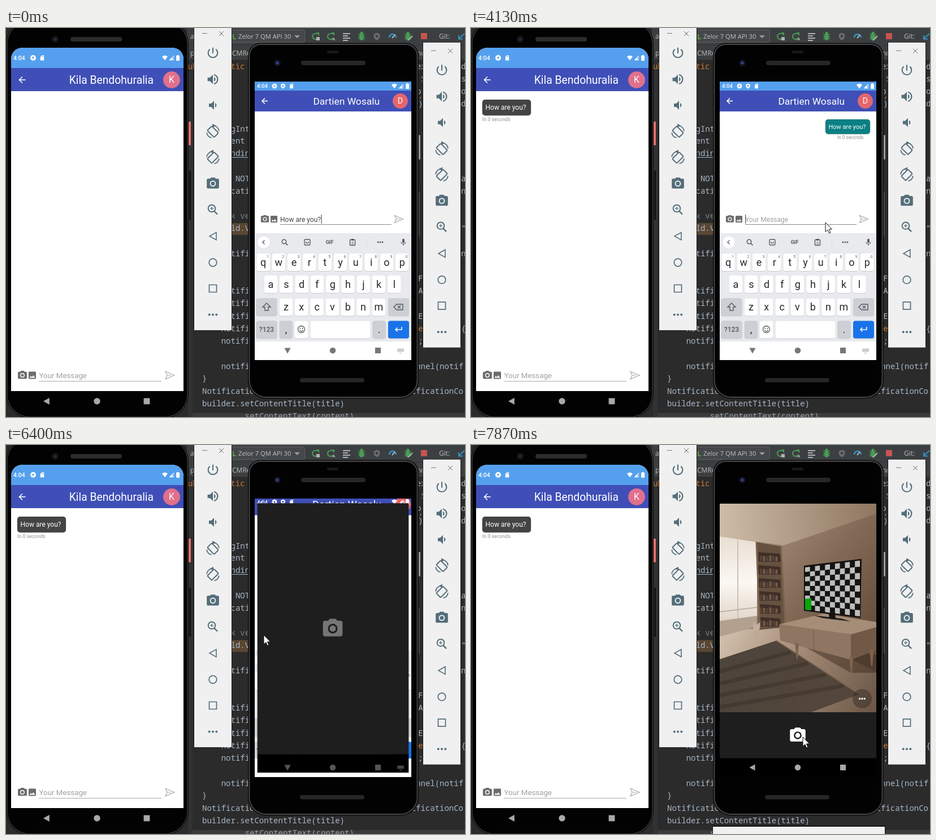
Animation, 812 px wide and 690 px high, one loop 8 s. Source, as an HTML page with a canvas:

```html
<!DOCTYPE html>
<html lang="en">
<head>
<meta charset="utf-8">
<title>Chat on two devices</title>
<style>
html, body { margin: 0; width: 100%; height: 100%; overflow: hidden; background: #2b2b2b; }
canvas { display: block; }
</style>
</head>
<body>
<canvas id="stage" width="812" height="690"></canvas>
<script>
const c = document.getElementById('stage').getContext('2d');
const LOOP = 8000, STEP = 200 / 3;
const LAUNCH = 6293, CLEAR = 2460, PREVIEW = 7480;
const SANS = 'Roboto, sans-serif', MONO = '"Noto Sans Mono", "DejaVu Sans Mono", monospace';
const clamp = v => Math.max(0, Math.min(1, v));
const ramp = (t, a, b) => clamp((t - a) / (b - a));

// Two-part curve: short fast start, long slow finish.
const cubic = (a, b, d, e, s) => a * (1 - s) ** 3 + 3 * b * (1 - s) ** 2 * s + 3 * d * (1 - s) * s * s + e * s ** 3;
function settle(x) {
  const early = x < 1 / 6;
  const xs = early ? [0, .05, .1333, 1 / 6] : [1 / 6, .2083, .25, 1];
  const ys = early ? [0, 0, .06, .4] : [.4, .82, 1, 1];
  let lo = 0, hi = 1;
  for (let i = 0; i < 20; i++) {
    const mid = (lo + hi) / 2;
    if (cubic(...xs, mid) < x) lo = mid; else hi = mid;
  }
  return cubic(...ys, hi);
}

// ---- drawing helpers ----
function rect(x, y, w, h, fill) { c.fillStyle = fill; c.fillRect(x, y, w, h); }
function round(x, y, w, h, r, fill, line, lw = 1) {
  c.beginPath(); c.roundRect(x, y, w, h, r);
  if (fill) { c.fillStyle = fill; c.fill(); }
  if (line) { c.strokeStyle = line; c.lineWidth = lw; c.stroke(); }
}
function disc(x, y, r, fill, line, lw = 1) {
  c.beginPath(); c.arc(x, y, r, 0, 7);
  if (fill) { c.fillStyle = fill; c.fill(); }
  if (line) { c.strokeStyle = line; c.lineWidth = lw; c.stroke(); }
}
function trace(p) { c.beginPath(); for (let i = 0; i < p.length; i += 2) c.lineTo(p[i], p[i + 1]); }
function poly(p, fill) { trace(p); c.closePath(); c.fillStyle = fill; c.fill(); }
function line(p, color, lw = 1, close) {
  trace(p); if (close) c.closePath();
  c.strokeStyle = color; c.lineWidth = lw; c.stroke();
}
function text(s, x, y, size, color, align = 'left', font = SANS) {
  c.font = (typeof size === 'number' ? size + 'px ' : size + ' ') + font;
  c.fillStyle = color; c.textAlign = align; c.fillText(s, x, y);
}
function grad(x0, y0, x1, y1, ...stops) {
  const g = c.createLinearGradient(x0, y0, x1, y1);
  stops.forEach((s, i) => g.addColorStop(i / (stops.length - 1), s));
  return g;
}
function group(fn, alpha = 1) { c.save(); c.globalAlpha *= alpha; fn(); c.restore(); }
function zoom(s, x, y) { c.translate(x, y); c.scale(s, s); c.translate(-x, -y); }

const icons = {
  camera: 'M9 2L7.2 4H4c-1.1 0-2 .9-2 2v12c0 1.1.9 2 2 2h16c1.1 0 2-.9 2-2V6c0-1.1-.9-2-2-2h-3.2L15 2zM12 7a5 5 0 1 0 0 10a5 5 0 1 0 0-10zM12 8.8a3.2 3.2 0 1 0 0 6.4a3.2 3.2 0 1 0 0-6.4z',
  image: 'M21 19V5c0-1.1-.9-2-2-2H5c-1.1 0-2 .9-2 2v14c0 1.1.9 2 2 2h14c1.1 0 2-.9 2-2zM8.5 13.5l2.5 3L14.5 12l4.5 6H5z',
  power: 'M13 3h-2v10h2zM17.8 5.2l-1.4 1.4A6.9 6.9 0 0 1 19 12a7 7 0 1 1-11.4-5.4L6.2 5.2A8.9 8.9 0 0 0 3 12a9 9 0 0 0 18 0c0-2.7-1.2-5.2-3.2-6.8z',
  louder: 'M3 9v6h4l5 5V4L7 9zM16.5 12A4.5 4.5 0 0 0 14 8v8a4.5 4.5 0 0 0 2.5-4zM14 3.2v2.1a7 7 0 0 1 0 13.4v2.1a9 9 0 0 0 0-17.6z',
  softer: 'M18.5 12A4.5 4.5 0 0 0 16 8v8a4.5 4.5 0 0 0 2.5-4zM5 9v6h4l5 5V4L9 9z',
  mic: 'M12 14a3 3 0 0 0 3-3V5a3 3 0 0 0-6 0v6a3 3 0 0 0 3 3zM17.3 11a5.3 5.3 0 0 1-10.6 0H5a7 7 0 0 0 6 6.7V21h2v-3.3a7 7 0 0 0 6-6.7z',
  wifi: 'M12 21L23 7A18 18 0 0 0 1 7z',
  signal: 'M2 22h20V2zM17 20V9L20 6v14z',
  battery: 'M9 2h6v2h3v18H6V4h3z',
  card: 'M10 2h9v20H5V8zM10 5v4h2V5zM14 5v4h2V5z',
  shield: 'M12 1L3 5v6c0 6 4 10 9 12c5-2 9-6 9-12V5zM12 7a4 4 0 1 0 0 8a4 4 0 1 0 0-8z'
};
for (const k in icons) icons[k] = new Path2D(icons[k]);
function icon(name, x, y, size, color) {
  group(() => {
    c.translate(x - size / 2, y - size / 2); c.scale(size / 24, size / 24);
    c.fillStyle = color; c.fill(icons[name], 'evenodd');
  });
}
function dots(x, y, gap, r, color) { for (let i = -1; i < 2; i++) disc(x + i * gap, y, r, color); }
function gear(x, y, r, color) {
  disc(x, y, r * .6, null, color, r * .5);
  for (let i = 0; i < 8; i++) {
    const a = i * Math.PI / 4;
    disc(x + Math.cos(a) * r * .85, y + Math.sin(a) * r * .85, r * .22, color);
  }
}
function back(x, y, s) {
  line([x + s, y, x - s, y], '#fff', 1.6);
  line([x, y - s, x - s, y, x, y + s], '#fff', 1.6);
}
function send(x, y, s) {
  line([x - s, y - s * .85, x + s, y, x - s, y + s * .85, x - s * .6, y], '#aaa', 1.2, true);
  line([x - s * .6, y, x + s * .3, y], '#aaa', 1);
}

// ---- editor behind the devices ----
function code(s, col, y, color = '#a9b7c6') { text(s, 347 + col * 8.42, y + 5, 14, color, 'left', MONO); }

function editor() {
  rect(0, 0, 812, 690, '#2b2b2b');
  rect(320, 0, 492, 57, '#3c3f41');
  rect(320, 30, 492, 1, '#323232');
  rect(320, 56, 492, 1, '#323232');
  rect(322, 57, 8, 633, '#303234');
  rect(400, 346, 30, 21, '#5a4632');
  const orange = '#cc7832', ui = '"Open Sans", sans-serif';
  text('a', 326, 19, 12, '#bbb', 'left', ui);
  text('p', 326, 49, 12, '#bbb', 'left', ui);
  text('CMReceiver', 400, 49, 12, '#bbb', 'left', ui);
  text('nd', 727, 49, 12, '#bbb', 'left', ui);
  round(396.5, 3.5, 132, 22, 3, '#45484a', '#5e6060');
  line([402, 11, 402, 19, 407, 19], '#62b543', 1.5);
  text('Zelor 7 QM API 30', 411, 19, 11.2, '#c0c0c0', 'left', ui);
  poly([510, 13, 520, 13, 515, 18], '#9a9da0');
  toolbar();

  code('public static', -4, 68, orange);
  const rows = [[179, 'gInt'], [200, 'ent'], [222, 'ndin'], [267, ' NOT'], [289, 'cati'],
    [333, 'k ve', '#808080'], [355, 'ld.V'], [400, 'tifi'], [466, 'tifi'], [488, 'tifi'], [511, 'tifi'],
    [533, 'tifi'], [555, 'tifi']];
  rows.forEach(([y, s, col]) => code(s, 6, y, col));
  line([400, 229.5, 428, 229.5], '#a9b7c6');
  code('no', 4, 533);
  code('no', 4, 555);
  code('notificationManager.createNotificationChannel(notif', 4, 600);
  code('}', 0, 621);
  code('NotificationCompat.Builder builder = new NotificationCo', 0, 644);
  code('builder.setContentTitle(title)', 0, 666);
  code('.setContentText(content)', 8, 688);
  rect(330, 683, 482, 7, 'rgba(100,100,100,.28)');

  [[68, 'ext'], [90, ' S'], [112, 'p']].forEach(([y, s]) => code(s, 45, y));
  [[119, ',', orange], [134, ')'], [444, 'FA'], [466, 'Ap'], [511, 'EA'], [533, 'ew', orange], [555, ';']]
    .forEach(([y, s, col]) => code(s, 45.4, y, col));
  [[68, 'd'], [90, 's'], [112, 'o'], [134, 'd'], [267, 'a'], [289, 'n'], [355, '"'], [400, 'n'], [533, '{']]
    .forEach(([y, s, col]) => code(s, 54.4, y, col));
}

function toolbar() {
  const green = '#499c54', grey = '#afb1b3', y = 15;
  [547, 574].forEach((x, i) => {
    c.beginPath(); c.arc(x, y, 5, .6, 5.2); c.strokeStyle = green; c.lineWidth = 2; c.stroke();
    poly([x + 1, 8, x + 7, 8, x + 7, 14], green);
    if (i) text('A', x + 3, 22, 'bold 8px', grey); else rect(x + 2, 16, 6, 6, grey);
  });
  for (let i = 0; i < 4; i++) rect(596, 9 + i * 4, i % 2 ? 9 : 13, 2, grey);
  [629, 711].forEach(x => {
    for (let i = -1; i < 2; i++) line([x - 6, y + i * 4, x + 6, y + i * 4], green, 1.4);
    c.beginPath(); c.ellipse(x, y + 1, 4, 6, 0, 0, 7); c.fillStyle = green; c.fill();
    disc(x, 9, 2.5, green);
  });
  line([711, 22, 719, 14], grey, 2);
  icon('shield', 656, 15, 14, '#6b6d6f');
  c.beginPath(); c.arc(684, 17, 6, Math.PI, 0); c.strokeStyle = '#3592c4'; c.lineWidth = 2.5; c.stroke();
  line([683, 18, 688, 12], grey, 2);
  rect(734, 9, 11, 11, '#c75450');
  text('Git:', 766, 19, 12, '#bbb', 'left', '"Open Sans", sans-serif');
  line([811, 10, 801, 19], '#3592c4', 2);
  line([801, 13, 801, 19.5, 808, 19.5], '#3592c4', 2);
}

// ---- emulator side panel ----
function panel(dx, dy) {
  const k = '#546e7a', x = 366, top = -5;
  group(() => {
    c.translate(dx, dy);
    rect(332, top - 1, 68, 538, '#161616');
    rect(333, top, 66, 541, '#f0f0f0');
    line([347, 9.5, 356, 9.5], '#777');
    line([377, 6, 385, 14], '#666'); line([385, 6, 377, 14], '#666');
    icon('power', x, 44, 25, k);
    icon('louder', x, 91, 25, k);
    icon('softer', x, 137, 24, k);
    [184, 230].forEach((y, i) => group(() => {
      c.translate(x, y); if (i) c.scale(-1, 1);
      c.save(); c.rotate(Math.PI / 4); round(-8.5, -5.5, 17, 11, 1.5, null, k, 2); c.restore();
      c.beginPath(); c.arc(0, 0, 11, -1.4, -.1); c.strokeStyle = k; c.lineWidth = 1.8; c.stroke();
      c.beginPath(); c.arc(0, 0, 11, 1.8, 3); c.stroke();
      poly([-1, -14, 5, -11, -1, -7], k);
    }));
    icon('camera', x, 276, 26, k);
    disc(364, 320, 6.3, null, k, 2);
    line([368.5, 325, 374, 330.5], k, 2.4);
    line([361, 320, 367, 320], k, 1.3); line([364, 317, 364, 323], k, 1.3);
    line([372, 362.5, 372, 376, 360, 369.3], k, 1.6, true);
    disc(x, 416, 6.8, null, k, 1.7);
    line([359.5, 455.5, 372.5, 455.5, 372.5, 468.5, 359.5, 468.5], k, 1.7, true);
    dots(x, 508.5, 6.3, 2, k);
  });
}

// ---- chat pieces ----
function statusIcons(x, y, r, right, size, first) {
  text('4:04', x, y + size * .36, '500 ' + size + 'px', '#fff');
  first();
  [right, right + r * 1.1, right + r * 2.2].forEach((px, i) =>
    icon(['wifi', 'signal', 'battery'][i], px, y, [11, 10, 12][i] * r / 10.5, '#fff'));
}
function avatar(x, y, r, letter, color) {
  disc(x, y, r, color);
  text(letter, x, y + r * .36, r * 1.05, '#fff', 'center');
}
function bubble(x, y, w, h, color, size, stampX, stampSize, alpha) {
  if (alpha <= 0) return;
  group(() => {
    round(x - .5, y, w + 1, h + 1, 5, 'rgba(0,0,0,.2)');
    round(x, y, w, h, 5, color);
    text('How are you?', x + 5.5, y + h / 2 + size * .37, size, '#fff');
    text('In 0 seconds', stampX, y + h + stampSize + 1, stampSize, '#909090');
  }, alpha);
}
function navShapes(x1, x2, x3, y, s, color, down) {
  poly(down ? [x1 - s, y - s * .8, x1 + s, y - s * .8, x1, y + s] : [x1 + s * .8, y - s, x1 + s * .8, y + s, x1 - s, y], color);
  disc(x2, y, s * .95, color);
  rect(x3 - s * .9, y - s * .9, s * 1.8, s * 1.8, color);
}

function leftPhone(t) {
  rect(323, 166, 4, 42, '#e8706c');
  rect(324, 253, 3, 87, '#111');
  round(0, -14, 323, 706, 42, '#0a0a0a');
  round(2, -12, 319, 702, 40, '#020202', '#383838', 1.5);
  round(114, 16, 91, 8, 4, '#2c2c2c');
  disc(87, 20, 6, '#15161a'); disc(87, 20, 2.5, '#24283a');
  group(() => {
    c.beginPath(); c.roundRect(9, 35, 305, 609, [20, 20, 0, 0]); c.clip();
    rect(9, 35, 305, 609, '#fff');
    rect(9, 35, 305, 36, '#55a0ee');
    rect(9, 71, 305, 41, '#3f4fb7');
  });
  statusIcons(13, 53, 10.5, 281, 10.5, () => {
    disc(48, 53, 5, '#fff'); rect(46.5, 51, 3, 3, '#55a0ee');
    icon('card', 64, 53, 11, '#fff');
  });
  back(29, 92, 5.5);
  text('Kila Bendohuralia', 261, 99, 19.3, '#fff', 'right');
  avatar(293, 92, 15, 'K', '#e0708c');
  bubble(20, 127, 86, 28, '#444', 12, 20, 8.8, ramp(t, 2290, 2410));
  icon('camera', 29, 616, 19, '#6c6c6c');
  icon('image', 46.5, 616, 17.5, '#6c6c6c');
  text('Your Message', 58.5, 621, 13.3, '#a0a0a0');
  rect(58, 626, 217, 1, '#aaa');
  send(290, 616, 8);
  navShapes(72, 161, 249, 662, 6, '#a9a9a9');
}

function chat(t) {
  const open = t > LAUNCH;
  rect(430, 85, 300, 515, '#fff');
  rect(430, 80, 300, 31, open ? '#3f4fb7' : '#55a0ee');
  rect(430, 111, 300, 37, '#3f4fb7');
  back(458, 129.5, 5);
  text('Dartien Wosalu', 661, 136, 17.4, '#fff', 'right');
  avatar(697.5, 129.5, 13.5, 'D', '#e5666c');
  bubble(627, 162, 79, 26, '#0b8083', 11, 648, 8.2, ramp(t, CLEAR - 20, CLEAR + 100));
  icon('camera', 458, 339, 17, '#6c6c6c');
  icon('image', 474, 339, 16, '#6c6c6c');
  const typed = t < CLEAR;
  text(typed ? 'How are you?' : 'Your Message', 485, 344, 12, typed ? '#444' : '#a0a0a0');
  rect(485, 348, 197, 1, '#888');
  send(695, 339, 7.5);
  const caret = [[0, 1060], [1590, 2590], [3060, 3590], [4120, 4590], [5120, 5590]];
  if (caret.some(([a, b]) => t >= a && t < b)) rect(typed ? 557.5 : 485, 331, 1.2, 16, '#555');
}

function key(x, y, w, label, fill = '#fff') {
  round(x - w / 2, y - 15.5, w, 32, 4, '#c9ccd0');
  round(x - w / 2, y - 15.5, w, 31, 4, fill);
  if (label) text(label, x, y + 6, 18, '#27292c', 'center');
}
function keyboard() {
  const k = '#55585c', grey = '#ccd0d5';
  rect(430, 364, 300, 192, '#e8eaed');
  disc(456, 380, 10.5, '#fff');
  line([457.5, 376.5, 454, 380, 457.5, 383.5], k, 1.4);
  disc(492, 379, 3.7, null, k, 1.5); line([495, 382, 498.5, 385.5], k, 1.7);
  round(528, 375, 10, 10, 2, null, k, 1.3);
  c.beginPath(); c.arc(533, 379, 2.7, 0, Math.PI); c.strokeStyle = k; c.lineWidth = 1.1; c.stroke();
  text('GIF', 572.5, 383.3, 'bold 9px', k, 'center');
  round(608.5, 375.5, 9, 10, 1, null, k, 1.4); rect(611, 374, 4, 3, k);
  line([611, 380, 615, 380], k); line([611, 383, 615, 383], k);
  rect(638, 373, 1, 14, '#d8dadd');
  dots(662, 380, 4, 1.4, k);
  icon('mic', 703, 380, 15, k);
  [...'qwertyuiop'].forEach((s, i) => {
    const x = 455 + i * 27.3;
    key(x, 415.5, 23.5, s);
    text((i + 1) % 10, x + 8, 408, 7, '#666', 'center');
  });
  [...'asdfghjkl'].forEach((s, i) => key(468.5 + i * 27.3, 454.5, 23.5, s));
  [...'zxcvbnm'].forEach((s, i) => key(495.5 + i * 27.3, 495, 23.5, s));
  key(461, 495, 37, '', grey);
  line([461, 488, 468, 495, 464, 495, 464, 501, 458, 501, 458, 495, 454, 495], k, 1.4, true);
  key(694.5, 495, 37, '', grey);
  line([686, 495, 691, 490, 702, 490, 702, 500, 691, 500], k, 1.4, true);
  line([693, 492.5, 698, 497.5], k, 1.3); line([698, 492.5, 693, 497.5], k, 1.3);
  key(461, 535, 37, '', grey);
  text('?123', 461, 539, '500 12px', k, 'center');
  key(495.5, 535, 23.5, ',', grey);
  key(522.5, 535, 23.5);
  disc(522.5, 534.5, 6, null, k, 1.3);
  disc(520.4, 533, 1, k); disc(524.6, 533, 1, k);
  c.beginPath(); c.arc(522.5, 535, 3, .2, 2.9); c.stroke();
  key(591.5, 535, 106);
  key(660, 535, 23.5, '.', grey);
  key(694.5, 535, 37, '', '#1a73e8');
  line([700, 530, 700, 535, 689, 535], '#fff', 1.5);
  line([692.5, 531.5, 689, 535, 692.5, 538.5], '#fff', 1.5);
}
function navBar(t, seen) {
  const live = seen > .5;
  navShapes(498, 578, 658, 572, 5.6, t < LAUNCH ? '#777' : live ? '#a8a8a8' : '#555', !live);
  if (t > 6600) return;
  const color = t < LAUNCH ? '#ccc' : '#444';
  round(692, 568.5, 12, 6, 1, color);
  rect(696, 576, 4, 1.5, color);
}

// ---- camera app ----
function room() {
  c.beginPath(); c.rect(440, 104, 277, 370); c.clip();
  rect(440, 104, 277, 370, grad(500, 150, 717, 330, '#a58e7a', '#836a56', '#644d3c'));
  poly([440, 104, 717, 104, 717, 122, 553, 178, 440, 162], grad(440, 140, 717, 120, '#cdbca8', '#8f7761'));
  poly([440, 162, 506, 172, 506, 312, 440, 325], grad(440, 165, 440, 320, '#e9dfd4', '#fbf8f3', '#dfd2c5'));
  line([472, 168, 472, 318], '#cfc1b1', 2);
  line([440, 296, 506, 288], '#c1b2a0', 2);
  poly([440, 330, 555, 322, 717, 402, 717, 474, 440, 474], grad(440, 330, 717, 460, '#d3c2af', '#a08873', '#6c5747'));
  poly([440, 312, 506, 303, 506, 322, 440, 340], '#b3a18f');
  poly([573, 348, 717, 372, 717, 404, 672, 404], 'rgba(60,44,33,.5)');
  poly([504, 172, 549, 180, 556, 323, 510, 328], '#66503f');
  for (let i = 0; i < 6; i++) {
    const y = 190 + i * 23;
    poly([508, y, 547, y + 3, 548, y + 17, 509, y + 17], '#3f2f27');
    for (let j = 0; j < 6; j++) rect(511 + j * 5.5, y + 6 + j % 3, 4, 10 - j % 3, j % 2 ? '#735a47' : '#544238');
  }
  line([505, 172, 511, 328], '#7a614c', 3); line([548, 179, 556, 324], '#7a614c', 3);
  poly([440, 380, 540, 347, 687, 442, 602, 474, 440, 474], grad(440, 380, 650, 460, '#4d443c', '#54463a'));
  for (let i = 0; i < 4; i++) line([440, 402 + i * 21, 566 + i * 31, 367 + i * 20], 'rgba(25,18,14,.2)', 7);
  line([540, 347, 687, 442], '#77624f', 2);
  // cat
  c.fillStyle = '#bda994'; c.beginPath(); c.ellipse(507, 338, 8, 11, 0, 0, 7); c.fill();
  disc(505, 324, 6, '#c3b09c');
  poly([499, 322, 500, 313, 505, 319], '#c3b09c'); poly([506, 319, 511, 314, 511, 323], '#c3b09c');
  // cabinet
  poly([545, 318, 624, 299, 717, 314, 717, 326, 672, 336], '#a58d77');
  poly([545, 318, 672, 336, 672, 381, 547, 347], '#8f7662');
  poly([672, 336, 717, 323, 717, 364, 672, 381], '#715947');
  line([606, 327, 607, 363], '#705a49');
  [[576, 356], [672, 381], [708, 368]].forEach(([x, y]) => poly([x - 3, y - 5, x + 4, y - 4, x + 2, y + 24, x, y + 24], '#7c6450'));
  // television
  poly([606, 302, 656, 308, 672, 313, 622, 307], '#241d1a');
  poly([632, 294, 644, 296, 645, 309, 634, 308], '#17130f');
  poly([589, 214, 691, 202, 689, 307, 589, 294], '#15110f');
  const at = (u, v) => [591 + 97 * u, (217 - 12 * u) + v * (75 + 24 * u)];
  const N = 11, M = 9;
  for (let i = 0; i < N; i++) for (let j = 0; j < M; j++) {
    const p = [...at(i / N, j / M), ...at((i + 1) / N, j / M), ...at((i + 1) / N, (j + 1) / M), ...at(i / N, (j + 1) / M)];
    poly(p, (i + j) % 2 ? '#141414' : '#bdbdbb');
  }
  poly([591, 273, 602, 272, 602, 293, 591, 292], '#08a50b');
  disc(692, 450, 17, 'rgba(40,32,28,.4)');
  dots(692, 450, 4.3, 1.7, '#fff');
}
function cameraApp(seen) {
  rect(440, 95, 277, 461, '#1e1e1e');
  rect(440, 555.5, 277, 34, '#000');
  if (seen < 1) icon('camera', 578, 325, 43, '#757575');
  if (seen > 0) group(() => {
    rect(440, 95, 277, 9.5, '#000');
    icon('camera', 578, 515, 33, '#fff');
    room();
  }, seen);
}

function rightPhone(t) {
  rect(729, 190, 4, 43, '#9a9a9a');
  rect(729, 290, 3, 80, '#4a4a4a');
  round(428, 26.5, 302, 631, [22, 22, 32, 32], '#0c0c0c');
  round(430.5, 29, 297, 626, [20, 20, 30, 30], '#020202', '#484848', 1.8);
  round(522, 58, 114, 8, 4, '#262626');
  round(520, 621, 114, 7.5, 4, '#262626');
  round(568, 40, 20, 5, 2, '#171717');
  disc(480, 62, 6, '#10131f'); disc(480, 62, 2.8, '#323c80');
  const open = t > LAUNCH, p = open ? settle(ramp(t, LAUNCH, LAUNCH + 425)) : 0;
  const seen = ramp(t, PREVIEW, PREVIEW + 240);
  const grow = s => zoom(s, 578.5, 341.5);
  group(() => {
    c.beginPath(); c.rect(440, 95, 277, 494); c.clip();
    group(() => { c.translate(0, open ? -16 : 0); grow(1 + .05 * p); chat(t); });
    group(() => { grow(1 + .05 * p); keyboard(); });
    rect(440, 556, 277, 34, '#fff');
    group(() => {
      c.translate(0, -2.5 * p);
      statusIcons(444, 103, 10.5, 687, 9.6, () => {
        gear(475, 103, 4.5, '#fff');
        icon('shield', 490, 103, 10, '#fff');
        icon('card', 505, 103, 10, '#fff');
      });
    });
    if (open) group(() => { grow(.85 + .15 * p); cameraApp(seen); }, ramp(t, LAUNCH + 35, LAUNCH + 85));
    navBar(t, seen);
  });
  if (t > 6790) {
    rect(427, 675, 306, 15, '#111');
    rect(428, 677, 304, 13, '#f0f0f0');
  }
}

// ---- pointer: time, x, y ----
const path = [[60, 806, 516], [870, 698, 351], [930, 697, 346], [2330, 697, 346], [2600, 697, 350],
  [2800, 697, 350], [2930, 637, 350], [3060, 637, 350], [3200, 632, 349], [3330, 632, 349], [3600, 627, 345],
  [5070, 627, 345], [5600, 454, 336], [6200, 454, 336], [6270, 456, 337], [6700, 456, 337], [7330, 600, 502], [7700, 587, 518]];
function pointer(t) {
  if (t < 60) return;
  const next = path.findIndex(p => p[0] > t + 3);
  const b = path[next < 0 ? path.length - 1 : next], a = next < 0 ? b : path[Math.max(0, next - 1)];
  const u = a === b ? 0 : ramp(t, a[0], b[0]);
  const e = next === 1 ? 1 - (1 - u) ** 2 : u * u * (3 - 2 * u);
  group(() => {
    c.translate(a[1] + (b[1] - a[1]) * e, a[2] + (b[2] - a[2]) * e);
    const arrow = [0, 0, 0, 16.5, 3.8, 13, 6.5, 19, 9, 18, 6.4, 12, 11.6, 12];
    poly(arrow, '#fff');
    line(arrow, '#111', 1, true);
  });
}

function frame(now) {
  const t = Math.floor(((now % LOOP) + 5) / STEP) * STEP;
  c.clearRect(0, 0, 812, 690);
  editor();
  leftPhone(t);
  panel(0, 0);
  panel(405, 30.7);
  rightPhone(t);
  pointer(t);
}
const start = performance.now();
function tick() { frame(performance.now() - start); requestAnimationFrame(tick); }
tick();
</script>
</body>
</html>
```
